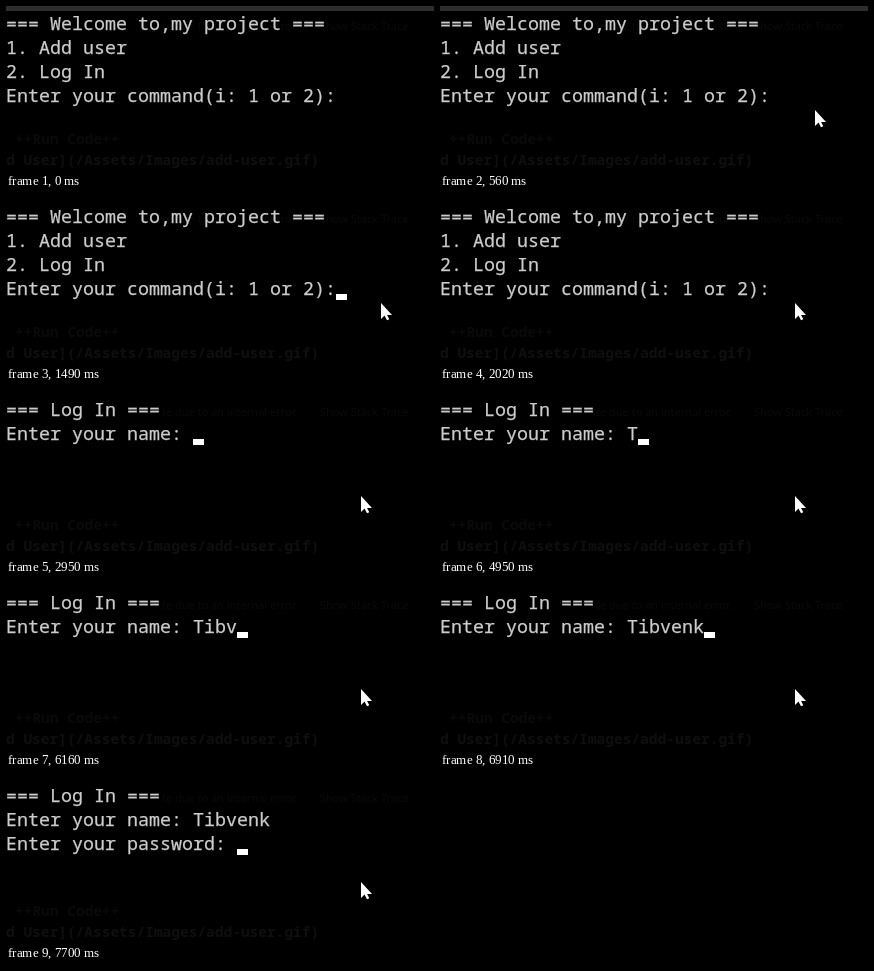
Recreate the animation shown at these times as an HTML page. Size 428 px wide and 165 px high, loop 8000 ms.

```html
<!DOCTYPE html>
<html lang="en">
<head>
<meta charset="utf-8">
<title>Console log in</title>
<style>
  html, body { margin: 0; width: 100%; height: 100%; overflow: hidden; background: #000; }
  svg { display: block; }
  text { white-space: pre; }
  .console { font: 18.333px "Noto Sans Mono", monospace; fill: #ccc; stroke: #ccc; stroke-width: .25; }
  .ghost { font: 11px "Noto Sans", sans-serif; fill: #0a0a0a; }
  .ghost .code { font: bold 14.5px "Noto Sans Mono", monospace; }
  .ghost .link { fill: #0f0f0f; }
</style>
</head>
<body>
<svg width="428" height="165" viewBox="0 0 428 165">
  <rect width="428" height="165"/>
  <rect id="strip" width="428" height="5"/>
  <g class="ghost">
    <text x="156" y="24">te due to an internal error.</text>
    <text x="314" y="24">Show Stack Trace</text>
    <text class="code" x="9" y="138">++Run Code++</text>
    <text class="code link" x="0" y="159">d User](/Assets/Images/add-user.gif)</text>
  </g>
  <g class="console" id="lines"></g>
  <rect id="caret" width="11" height="6" fill="#fff"/>
  <path id="pointer" d="M0 0V16L3.5 12.6L6 17.2L8.3 16.2L6.1 12H11Z" fill="#fff"/>
</svg>
<script>
const LOOP = 8000, CELL = 11, ROW = 24, BLINK = 530;
const FOCUS = 960, CHOICE = 2550, SUBMIT = 2880, LOGIN = 2950, PASSWORD = 7700;
const $ = id => document.getElementById(id);

const menu = ["=== Welcome to,my project ===", "1. Add user", "2. Log In"];
const prompt = "Enter your command(i: 1 or 2):";
const userName = "Tibvenk";

// The name is typed in two bursts with a pause between them.
const nameKeys = [...userName].map((_, i) => i < 3 ? 4950 + 200 * i : 6160 + 250 * (i - 3));

const rows = Array.from({ length: 5 }, (_, i) => {
  const row = document.createElementNS("http://www.w3.org/2000/svg", "text");
  row.setAttribute("y", ROW * (i + 1));
  return $("lines").appendChild(row);
});

function screenAt(t) {
  if (t < LOGIN) {
    const lines = [...menu, prompt + (t >= CHOICE ? "2" : "")];
    return t >= SUBMIT ? [...lines, ""] : lines;
  }
  const typed = nameKeys.filter(key => key <= t).length;
  const lines = ["=== Log In ===", "Enter your name: " + userName.slice(0, typed)];
  return t >= PASSWORD ? [...lines, "Enter your password: "] : lines;
}

// Each screen has its own blink clock; a key press turns the caret on until the next tick.
function caretOn(t) {
  const first = FOCUS + BLINK;
  if (t < first) return false;
  const clock = t < LOGIN ? first : t < PASSWORD ? LOGIN + 80 : PASSWORD;
  const shown = [first, CHOICE, SUBMIT, LOGIN, ...nameKeys, PASSWORD].filter(x => x <= t).pop();
  const ticks = time => Math.max(0, Math.floor((time - clock) / BLINK));
  return (ticks(t) - ticks(shown)) % 2 === 0;
}

function easeOut(t, from, to) {
  const p = Math.min(1, Math.max(0, (t - from) / (to - from)));
  return 1 - (1 - p) ** 2;
}

function draw(t) {
  const lines = screenAt(t);
  rows.forEach((row, i) => row.textContent = lines[i] || "");

  const last = lines.length - 1;
  $("caret").setAttribute("x", lines[last].length * CELL);
  $("caret").setAttribute("y", 23 + last * ROW);
  $("caret").setAttribute("visibility", caretOn(t) ? "visible" : "hidden");

  const enter = easeOut(t, 140, 560);
  const x = 385 - 10 * enter - 20 * easeOut(t, 1490, 1950);
  const y = 170 - 66 * enter;
  $("pointer").setAttribute("transform", `translate(${Math.round(x)} ${Math.round(y)})`);
  $("strip").setAttribute("fill", t < FOCUS ? "#2d2d2d" : "#000");
}

const start = performance.now();
function tick() {
  draw((performance.now() - start) % LOOP);
  requestAnimationFrame(tick);
}
tick();
</script>
</body>
</html>
```
